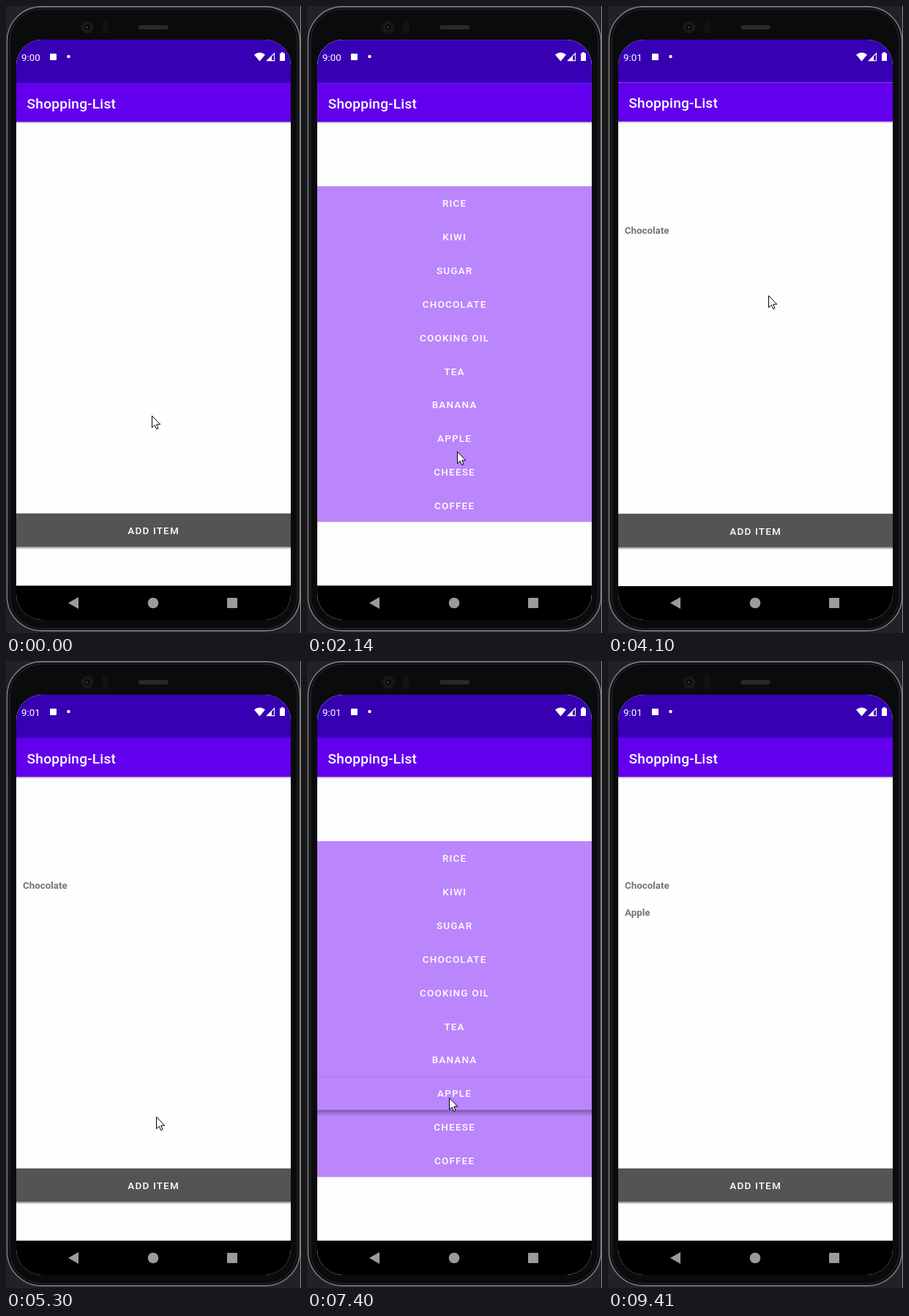
An HTML page that plays this animation: 403 by 856 pixels, repeating every 9970 ms.

```html
<!DOCTYPE html>
<html lang="en">
<head>
<meta charset="utf-8">
<title>Shopping list</title>
<style>
html, body { margin: 0; height: 100%; overflow: hidden; background: #202226; }
svg { display: block; width: 100%; height: 100%; }
text { font: 500 13.35px Roboto, sans-serif; fill: #fff; }
.title { font-size: 19.08px; letter-spacing: .0125em; }
.caps { font-size: 13.45px; letter-spacing: .0893em; text-anchor: middle; }
.item { font-weight: 700; fill: #757575; }
#clock { font-weight: 400; }
</style>
</head>
<body>
<svg id="stage" viewBox="0 0 403 856"></svg>
<script>
const LOOP = 9970, FRAME = 133, ROW = 45.85, LIST_TOP = 246;
const GOODS = ['Rice', 'Kiwi', 'Sugar', 'Chocolate', 'Cooking oil', 'Tea', 'Banana', 'Apple', 'Cheese', 'Coffee'];

// Pointer moves: when, and where the tip ends up
const MOVES = [
  { from: 0, to: 0, x: 199, y: 559 },
  { from: 220, to: 980, x: 196, y: 707 },
  { from: 1900, to: 2590, x: 224, y: 409 },
  { from: 2740, to: 2740, x: 229, y: 371 },
  { from: 3020, to: 3280, x: 219, y: 395 },
  { from: 4490, to: 4880, x: 212, y: 550 },
  { from: 5150, to: 5282, x: 205, y: 622 },
  { from: 5414, to: 5810, x: 205, y: 714 },
  { from: 6700, to: 7240, x: 194, y: 596 },
  { from: 7800, to: 8220, x: 239, y: 726 },
  { from: 8890, to: 9280, x: 196, y: 711 }
];
const SWITCHES = [
  { at: 1750, opens: true }, { at: 3940, opens: false },
  { at: 6430, opens: true }, { at: 7670, opens: false }
];

const rect = (x, y, w, h, fill, more = '') =>
  `<rect x="${x}" y="${y}" width="${w}" height="${h}" fill="${fill}" ${more}/>`;
const text = (x, y, s, cls, id = '') => `<text x="${x}" y="${y}" class="${cls}" id="${id}">${s}</text>`;
const caps = (y, s) => text(201.6, y, s.toUpperCase(), 'caps');
const page = content =>
  rect(14, 46, 375, 792, '#fefefe') + rect(14, 46, 375, 59, '#3700b3') +
  rect(14, 105, 375, 53.3, '#6200ee') + rect(14, 158.3, 375, 3, 'url(#shade)', 'opacity=".5"') +
  text(28.6, 139.8, 'Shopping-List', 'title') + content + rect(14, 791.4, 375, 47, '#000');

document.getElementById('stage').innerHTML = `
<defs>
  <linearGradient id="shade" x2="0" y2="1">
    <stop stop-opacity=".45"/><stop offset="1" stop-opacity="0"/>
  </linearGradient>
  <clipPath id="glass">${rect(14, 46, 375, 792, '#000', 'rx="35"')}</clipPath>
</defs>
${rect(0, 0, 403, 856, '#202226')}
${rect(1.5, 1, 400, 852, '#08090a', 'rx="47" stroke="#707173" stroke-width="1.8"')}
${rect(5, 4, 393, 846, '#0a0b0c', 'rx="44" stroke="#2e2f31"')}
${rect(402, 0, 1, 856, '#8d8e90')}
<circle cx="111" cy="29" r="9" fill="#151617"/>
<circle cx="111" cy="29" r="5" fill="#08090a" stroke="#292a2d"/>
<circle cx="110.5" cy="29" r="1.6" fill="#3a3b40"/>
${rect(131, 20, 9, 18, '#111213', 'rx="4"')}
${rect(181, 26, 41, 6, '#29292a', 'rx="3"')}
<g clip-path="url(#glass)">
  ${rect(14, 46, 375, 792, '#000')}
  <g id="home">${page(
    text(23, 310.8, 'Chocolate', 'item', 'first') + text(23, 348.4, 'Apple', 'item', 'second') +
    rect(14, 692.7, 375, 45.6, '#545456') +
    rect(14, 738.3, 375, 3.5, 'url(#shade)') +
    rect(14, 740, 375, 9, 'url(#shade)', 'id="lift"') +
    caps(721, 'Add item'))}</g>
  <g id="list">${page(
    rect(14, LIST_TOP, 375, ROW * GOODS.length, '#bb86fc') +
    `<g id="press">${rect(14, 0, 375, 1, '#000', 'opacity=".08"')}${rect(14, ROW, 375, 9, 'url(#shade)', 'opacity=".75"')}</g>` +
    GOODS.map((name, i) => caps(LIST_TOP + 28.3 + i * ROW, name)).join(''))}</g>
</g>
<g fill="#fff">
  ${text(21, 74.8, '9:00', '', 'clock')}
  ${rect(60, 65, 9, 9, '#fff', 'rx="1"')}
  <circle cx="85.5" cy="69" r="2.2"/>
  <path d="M339 66.5Q346.5 60.5 354 66.5L346.5 75.5Z"/>
  <path d="M355 75.2L367 63.2V75.2ZM363 69V74H366V66Z" fill-rule="evenodd"/>
  <path d="M374 64.5H376V63H379V64.5H381V75H374Z"/>
</g>
<g fill="#9b9b9b">
  <path d="M85 815L99 807V823Z"/>
  <circle cx="201" cy="815" r="7.3"/>
  ${rect(302, 808, 14, 14, '#9b9b9b', 'rx="1"')}
</g>
<path id="pointer" d="M.5 .5V16.6L4.2 13.2L6.6 18.6L9 17.6L6.7 12.2H11.7Z" fill="#fff" stroke="#000"/>`;

const [home, list, first, second, lift, press, clock, pointer] =
  ['home', 'list', 'first', 'second', 'lift', 'press', 'clock', 'pointer']
    .map(id => document.getElementById(id));
const clamp = v => Math.max(0, Math.min(1, v));
const show = (el, on) => el.setAttribute('visibility', on ? 'inherit' : 'hidden');
const move = (el, x, y) => el.setAttribute('transform', `translate(${x} ${y})`);
const zoom = (el, s) =>
  el.setAttribute('transform', `translate(201.5 442) scale(${s}) translate(-201.5 -442)`);

// Fast start, then a very slow finish
function ease(x) {
  if (x >= 1) return 1;
  return x < 1 / 6 ? .4 * (x * 6) ** 3 : 1 - .6 * Math.exp(-8.5 * (x - 1 / 6));
}

// The pointer jumps once per recorded frame: first at `from`, last at `to`
function pointerAt(t) {
  const i = MOVES.findLastIndex(m => m.from <= t);
  const end = MOVES[i], start = MOVES[i - 1] || end;
  const gaps = Math.round((end.to - end.from) / FRAME);
  const done = gaps ? Math.floor((t - end.from) / (end.to - end.from) * gaps + 1e-6) : 0;
  const k = clamp((done + 1) / (gaps + 1));
  return ['x', 'y'].map(c => Math.round(start[c] + (end[c] - start[c]) * k));
}

function drawSwitch(t) {
  const { at, opens } = SWITCHES.findLast(s => s.at <= t) || { at: -LOOP, opens: false };
  const age = 66 + FRAME * Math.floor((t - at) / FRAME);
  const toward = v => opens ? v : 1 - v;
  const open = toward(ease(age / 400));
  zoom(home, 1 + .05 * open);
  zoom(list, .85 + .15 * open);
  list.setAttribute('opacity', toward(clamp((age - 48) / 54)));
}

function draw(t) {
  const within = (a, b) => t >= a && t < b;
  drawSwitch(t);
  show(first, t >= 3940);
  show(second, t >= 7670);
  show(lift, within(1350, 1630) || within(6120, 6430));
  show(press, within(3560, 3800) || within(7400, 7670));
  move(press, 0, LIST_TOP + ROW * GOODS.indexOf(t < 5000 ? 'Chocolate' : 'Apple'));
  clock.textContent = t < 4080 ? '9:00' : '9:01';
  show(pointer, t < 9410);
  move(pointer, ...pointerAt(t));
}

function tick() {
  draw(performance.now() % LOOP);
  requestAnimationFrame(tick);
}
tick();
</script>
</body>
</html>
```
